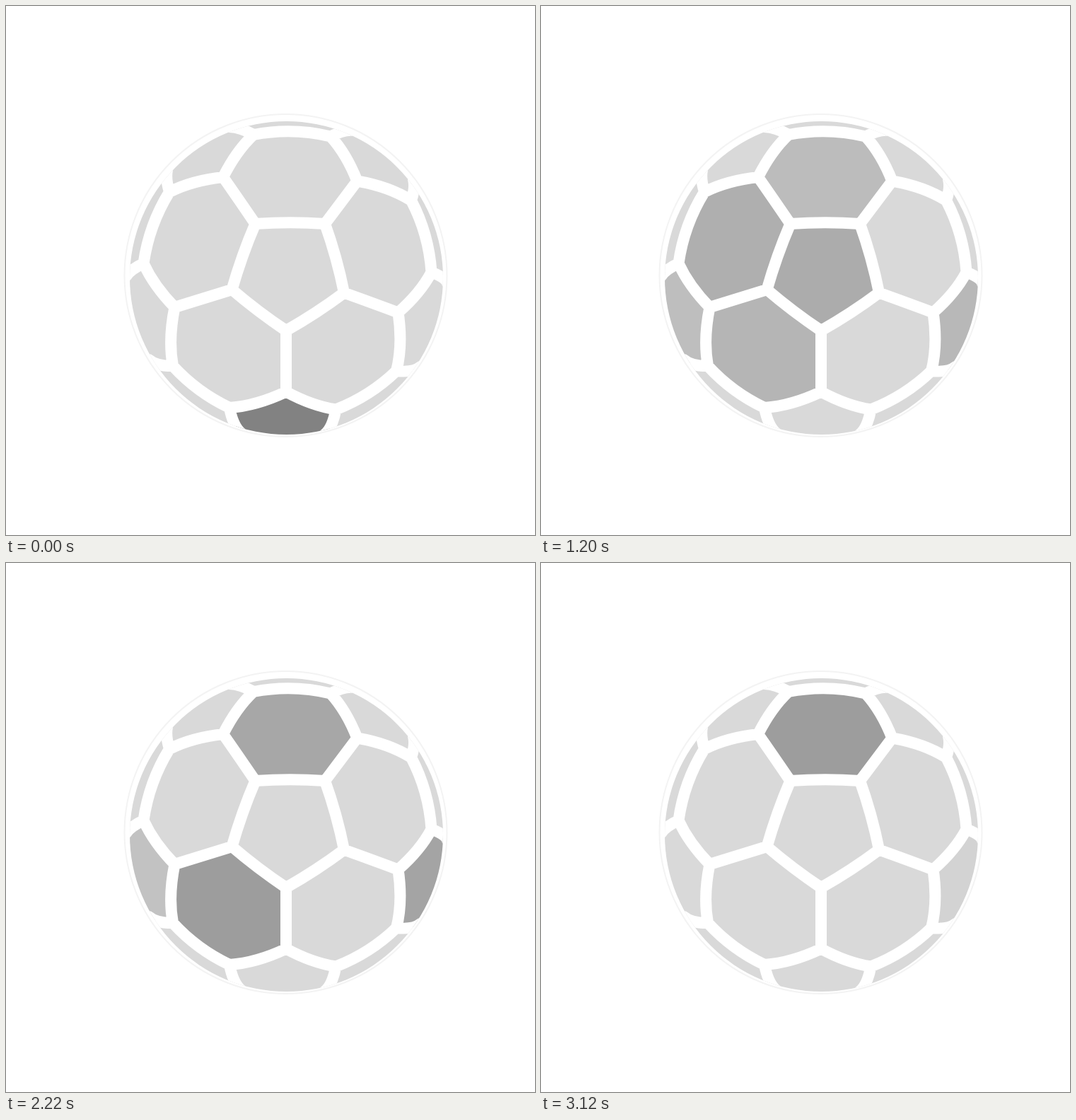
These frames come from a looping animation (748x748 px, 3.6 s). An HTML page with a canvas:

```html
<!DOCTYPE html>
<html lang="en">
<head>
<meta charset="utf-8">
<title>Ball</title>
<style>
  html, body { margin: 0; height: 100%; overflow: hidden; background: #fff; }
  canvas { display: block; }
</style>
</head>
<body>
<canvas width="748" height="748"></canvas>
<script>
const ctx = document.querySelector("canvas").getContext("2d");
const LOOP = 3600, FADE = 180, BASE = 217;
const CX = 395.5, CY = 381, RADIUS = 228, SEAM = 16;

// Seam junctions; lower-case ones lie on the rim of the ball.
const points = {
  A: [352.5, 308], B: [451, 308], C: [478, 405.5], D: [396, 459], E: [319.5, 401],
  F: [307, 242], G: [496.5, 247.5], H: [350, 182], I: [459, 184.5], J: [231, 263],
  K: [194.5, 364], L: [238.5, 426], M: [573, 275], N: [601.5, 376.5], O: [554.5, 433.5],
  P: [236, 509], Q: [316, 568], R: [396, 545.5], S: [466.5, 570.5], T: [552, 516],
  h: [316, 171], i: [492, 176], j: [228, 232], k: [170, 382], m: [576, 245],
  n: [624, 392], p: [202, 500], q: [333, 604], s: [450, 606], t: [586, 510]
};

const plainPanels = ["GMNOCB", "hHIi", "hHFJj", "iIGMm", "jJKk", "mMNn", "pPQq", "tTSs"];

// Outline, then when the panel starts to darken, when it fades, and its darkest grey.
const litPanels = [
  ["RSsqQ", -1, 0, 130, 700],
  ["COTSRD", 0, 690, 167],
  ["FAELKJ", 480, 1180, 170],
  ["ABCDE", 770, 1730, 153],
  ["KLPpk", 950, 2100, 148],
  ["EDRQPL", 450, 2520, 156],
  ["ONntT", 250, 2960, 160],
  ["HIGBAF", 300, LOOP, 156]
];

function onSphere([x, y]) {
  const dx = x - CX, dy = y - CY;
  return [dx, dy, Math.sqrt(Math.max(0, RADIUS ** 2 - dx ** 2 - dy ** 2))];
}

// Adds the great-circle arc between two junctions, seen from the front.
function addArc(path, from, to) {
  const a = onSphere(points[from]), b = onSphere(points[to]);
  const sum = a.map((v, axis) => v + b[axis]);
  const bulge = 2 * RADIUS / Math.hypot(...sum) - 0.5;
  path.quadraticCurveTo(CX + sum[0] * bulge, CY + sum[1] * bulge, ...points[to]);
}

const seams = new Path2D();

function makePanel(outline) {
  const path = new Path2D();
  path.moveTo(...points[outline[0]]);
  [...outline].forEach((from, index) => {
    const to = outline[(index + 1) % outline.length];
    addArc(path, from, to);
    if (/[A-Z]/.test(from + to)) {
      seams.moveTo(...points[from]);
      addArc(seams, from, to);
    }
  });
  return path;
}

const plainPaths = plainPanels.map(makePanel);
const litPaths = litPanels.map(([outline]) => makePanel(outline));
const clamp = v => Math.min(1, Math.max(0, v));

function greyAt(time, [, start, end, dark, fade = FADE]) {
  const darken = 1 - (1 - clamp((time - start) / (end - start))) ** 2;
  const remain = 1 - clamp((time - end) / fade);
  return Math.round(BASE - (BASE - dark) * darken * remain);
}

function fillGrey(path, grey) {
  ctx.fillStyle = `rgb(${grey},${grey},${grey})`;
  ctx.fill(path);
}

const rim = new Path2D();
rim.arc(CX, CY, RADIUS, 0, 2 * Math.PI);
const face = new Path2D();
face.arc(CX + 1, CY + 3.5, 221.5, 0, 2 * Math.PI);

function draw() {
  const time = performance.now() % LOOP;
  ctx.clearRect(0, 0, 748, 748);
  ctx.strokeStyle = "#f3f3f3";
  ctx.lineWidth = 2;
  ctx.stroke(rim);

  ctx.save();
  ctx.clip(face);
  plainPaths.forEach(path => fillGrey(path, BASE));
  litPaths.forEach((path, index) => fillGrey(path, greyAt(time, litPanels[index])));
  ctx.strokeStyle = "#fff";
  ctx.lineWidth = SEAM;
  ctx.lineCap = "round";
  ctx.stroke(seams);
  ctx.restore();

  requestAnimationFrame(draw);
}
draw();
</script>
</body>
</html>
```
